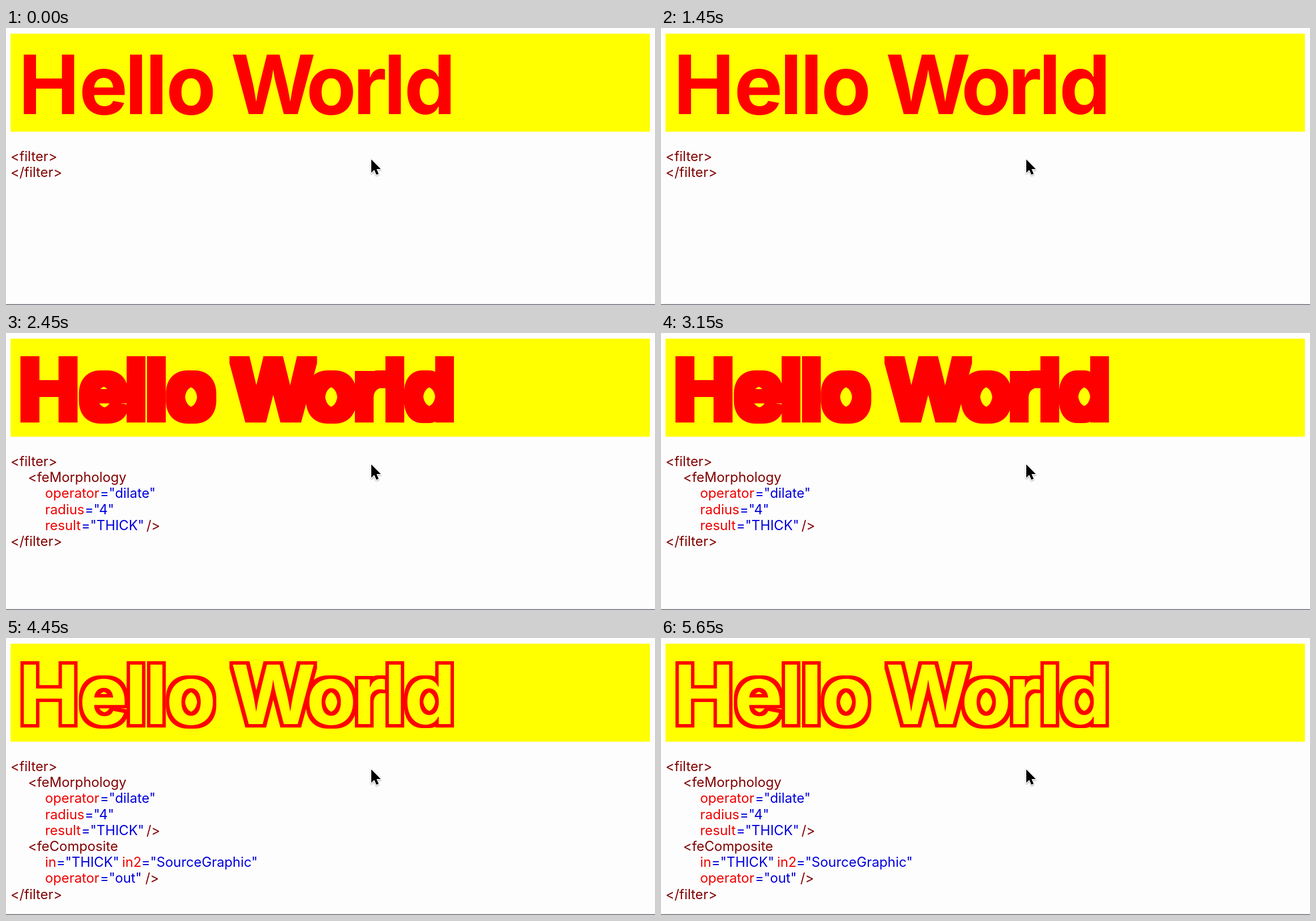
An HTML page for the animation above (5.7 s loop, 1146 px wide and 489 px high).

```html
<!DOCTYPE html>
<html lang="en">
<head>
<meta charset="utf-8">
<title>Outlined text with SVG filters</title>
<style>
  html, body { margin: 0; width: 100%; height: 100%; overflow: hidden; background: #fdfdfd; }
  svg { display: block; width: 1146px; height: 489px; }
  text { white-space: pre; }
  #title { font: 700 144.4px Inter, Roboto, sans-serif; fill: #f00; }
  #code { font: 400 23.8px Inter, Roboto, sans-serif; }
  .tag { fill: #800000; }
  .attr { fill: #f00000; }
  .value { fill: #0000dc; }
</style>
</head>
<body>
<svg viewBox="0 0 1146 489">
  <defs>
    <filter id="thick" filterUnits="userSpaceOnUse" x="0" y="0" width="1146" height="200">
      <feMorphology operator="dilate" radius="6"/>
    </filter>
    <filter id="outline" filterUnits="userSpaceOnUse" x="0" y="0" width="1146" height="200">
      <feMorphology operator="dilate" radius="6" result="THICK"/>
      <feComposite in="THICK" in2="SourceGraphic" operator="out"/>
    </filter>
    <filter id="shadow" x="-50%" y="-50%" width="200%" height="200%">
      <feDropShadow dx="0" dy="1.5" stdDeviation="1.2" flood-opacity=".35"/>
    </filter>
  </defs>
  <rect x="8" y="10" width="1129" height="173" fill="#ff0"/>
  <text id="title" y="152">Hello World</text>
  <g id="code"></g>
  <path d="M645 232 V255.5 L650.3 250.4 L654 259 L658 257.2 L654.3 249 H661.8 Z"
        stroke="#fff" stroke-width="2.4" paint-order="stroke" stroke-linejoin="round" filter="url(#shadow)"/>
  <rect y="487.6" width="1146" height="1.4" fill="#666673"/>
</svg>
<script>
const LOOP = 5700;
const STAGES = [
  { start: 0, lines: 0, filter: 'none' },
  { start: 1700, lines: 4, filter: 'url(#thick)' },
  { start: 3700, lines: 7, filter: 'url(#outline)' },
];

// Each line is a list of [x, class, text] tokens.
const BODY = [
  [[39, 'tag', '<feMorphology']],
  [[69, 'attr', 'operator'], [166, 'value', '="dilate"']],
  [[69, 'attr', 'radius'], [139, 'value', '="4"']],
  [[69, 'attr', 'result'], [133, 'value', '="THICK"'], [248, 'tag', '/>']],
  [[39, 'tag', '<feComposite']],
  [[69, 'attr', 'in'], [89, 'value', '="THICK"'], [205, 'attr', 'in2'], [239, 'value', '="SourceGraphic"']],
  [[69, 'attr', 'operator'], [166, 'value', '="out"'], [246, 'tag', '/>']],
];
const OPEN = [[8, 'tag', '<filter>']];
const CLOSE = [[8, 'tag', '</filter>']];

const title = document.getElementById('title');
const code = document.getElementById('code');

// Place each letter by the left edge of its ink.
function placeTitle() {
  const inkLeft = [31, 134, 219, 255, 287.5, 380, 400, 535, 622, 676, 708];
  const ctx = document.createElement('canvas').getContext('2d');
  ctx.font = '700 144.4px Inter, Roboto, sans-serif';
  const xs = [...title.textContent].map((letter, i) =>
    letter === ' ' ? inkLeft[i] : inkLeft[i] + ctx.measureText(letter).actualBoundingBoxLeft);
  title.setAttribute('x', xs.join(' '));
}

function drawLine(tokens, row) {
  const line = document.createElementNS('http://www.w3.org/2000/svg', 'text');
  line.setAttribute('y', 235 + row * 28.2);
  for (const [x, kind, text] of tokens) {
    const span = document.createElementNS('http://www.w3.org/2000/svg', 'tspan');
    span.setAttribute('x', x);
    span.setAttribute('class', kind);
    span.textContent = text;
    line.append(span);
  }
  code.append(line);
}

let current;
function show(stage) {
  if (stage === current) return;
  current = stage;
  title.setAttribute('filter', stage.filter);
  code.replaceChildren();
  [OPEN, ...BODY.slice(0, stage.lines), CLOSE].forEach(drawLine);
}

const origin = performance.now();
function frame() {
  const time = (performance.now() - origin) % LOOP;
  show(STAGES.findLast(stage => time >= stage.start));
  requestAnimationFrame(frame);
}

placeTitle();
frame();
</script>
</body>
</html>
```
